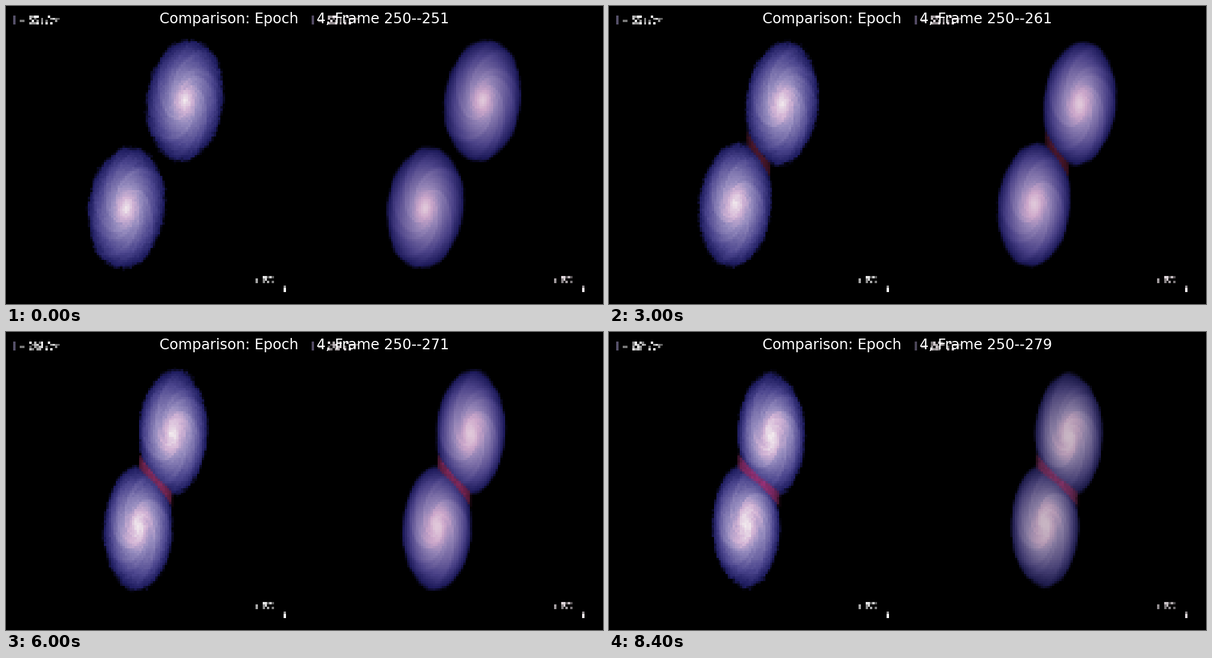
A matplotlib script for the animation above (8.7 s loop, 1000 px wide and 500 px high).

```python
import numpy as np
import matplotlib.pyplot as plt
from matplotlib.animation import FuncAnimation

GRID, SIDE, FRAMES, INTERVAL = 128, 500, 29, 300
CELL = SIDE / GRID
X, Y = np.meshgrid(*[(np.arange(GRID) + 0.5) * CELL] * 2)
GRAIN = np.random.default_rng(4).normal(size=(GRID, GRID))
MIDDLE = np.array([250.8, 248.7])

# Key colours of a disc from its core to its rim
RADII = [0, 0.17, 0.37, 0.75, 0.96, 1.03]
DISC = ["#f2eaee", "#d4b5d6", "#988ec0", "#4c468e", "#1e1c5f", "#000000"]
DISC_RGB = np.array([plt.matplotlib.colors.to_rgb(c) for c in DISC]) * 255


def disc_color(r):
    return np.stack([np.interp(r, RADII, c) for c in DISC_RGB.T], -1)


def spiral(r, angle, p):
    """Radius offset: fine streaks plus two broad arms that grow with time."""
    phase = angle + 2 * np.log(r + 0.05) + 0.9 * (1 - p)
    streaks = sum(np.cos(m * phase + m * m) for m in (5, 9, 14))
    arms = p * np.cos(2 * phase - 1.57)
    fade = np.clip(r * 3, 0, 1)
    return fade * (0.016 * streaks * np.clip(2 - 1.6 * r, 0.3, 1) + 0.06 * arms)


def galaxy(p, flip, predicted):
    """Colours of one inclined disc; flip = -1 gives its mirrored partner."""
    cx, cy = np.array([300, 158.5]) + p * np.array([-28, 14]) - MIDDLE
    shift = -0.5 - flip if predicted else 0
    dx = flip * (X - MIDDLE[0] - shift) - cx
    dy = flip * (Y - MIDDLE[1]) - cy
    tilt = np.radians(6.5 - 2.5 * p)
    cos, sin = np.cos(tilt), np.sin(tilt)
    half_w, half_h = 64 - 6.5 * p, 102 - p

    u = (dx * cos + dy * sin) / half_w
    v = (dy * cos - dx * sin) / half_h
    v = v - 0.035 * p * np.clip(1 - np.hypot(u, v), 0, 1)
    r = np.hypot(u, v)
    bright = 0.6 * p * r * np.clip(1 - r, 0, 1) ** 1.5
    r = r - bright + spiral(r, np.arctan2(-v, u), p) * (0.85 if predicted else 1)
    r += GRAIN * (0.004 if predicted else 0.012)
    return disc_color(np.hypot(r, 0.06) if predicted else r)


def bridge(p):
    """Colour and coverage of the gas band along the contact line."""
    along = np.abs(X - 250.5) / (10 + 24 * p)
    width = 9 + 6 * along
    cover = np.clip((width - np.abs(contact_gap(p))) / 6, 0, 1)
    cover *= np.clip((1.1 - along) * 6, 0, 1) * min(4 * p, 1) * 0.92
    red = 150 * np.sin(np.pi / 2 * p)
    light = 1 - 0.38 * along.clip(0, 1) ** 2 + 0.05 * GRAIN
    color = red * np.array([1, 0.31, 0.45 + 0.3 * p])
    return light[..., None] * color, cover[..., None]


def contact_gap(p):
    return Y - 248 - (1.7 - 0.8 * p) * (X - 250)


def scribble(img, row, col, height, width, density, seed):
    """Illegible lettering: random cells of random brightness."""
    rng = np.random.default_rng(seed)
    ink = rng.random((height, width)) < density
    shade = rng.uniform(90, 250, (height, width)) * ink
    img[row:row + height, col:col + width] = shade[..., None]


def labels(img, i):
    img[4:8, 3] = (85, 80, 105)
    img[6, 6:8] = 120
    scribble(img, 4, 10, 4, 6, 0.65, i // 14)
    scribble(img, 4, 17, 4, 6, 0.5, 9)
    scribble(img, 116, 107, 3, 8, 0.45, 5)
    img[120, 119] = 150
    img[121:123, 119] = 255


def panel(i, predicted):
    p = i / (FRAMES - 1)
    img = np.where(contact_gap(p)[..., None] < 0,
                   galaxy(p, 1, predicted), galaxy(p, -1, predicted))
    glow, cover = bridge(p)
    img = img * (1 - cover) + glow * cover
    labels(img, i)
    if predicted:
        img *= (0.97, 0.93, 0.95)
        if i == FRAMES - 1:  # the last prediction is washed out
            img = 0.75 * img + 0.15 * img.mean(axis=2, keepdims=True)
    return img


def render(i):
    both = np.hstack([panel(i, False), panel(i, True)])
    return both.clip(0, 255).astype(np.uint8)


fig = plt.figure(figsize=(10, 5), dpi=100, facecolor="black")
ax = fig.add_axes([0, 0, 1, 1])
ax.axis("off")
picture = ax.imshow(render(0), interpolation="nearest", aspect="auto")
title = fig.text(0.5, 0.98, "", color="white", ha="center", va="top",
                 family="DejaVu Sans", size=17.28)


def update(i):
    picture.set_data(render(i))
    title.set_text(f"Comparison: Epoch {4:4d}, Frame 250--{251 + i}")
    return picture, title


animation = FuncAnimation(fig, update, frames=FRAMES, interval=INTERVAL,
                          repeat=True, repeat_delay=0)
plt.show()
```
